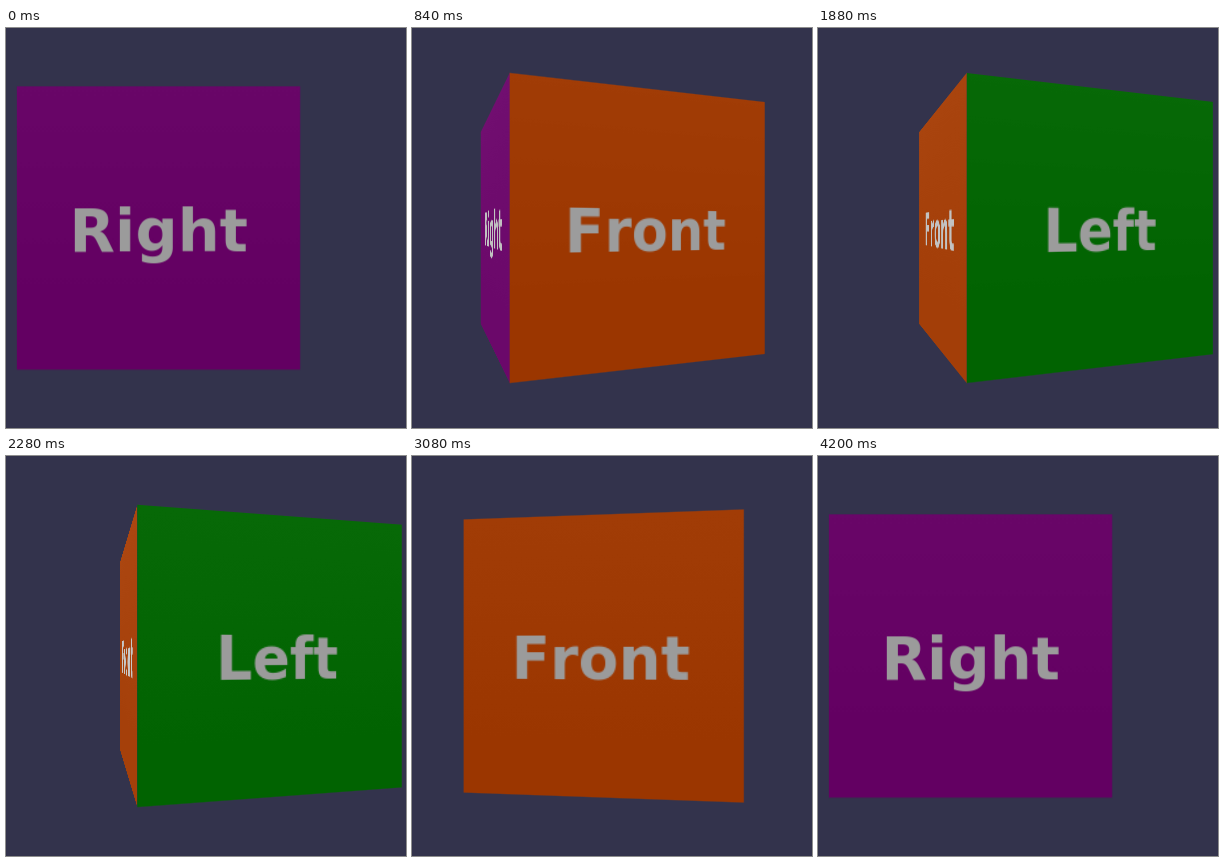
These frames come from a looping animation (400x400 px, 4.24 s). An HTML page:

```html
<!DOCTYPE html>
<html lang="en">
<head>
<meta charset="utf-8">
<title>Swinging cube</title>
<style>
  html, body { margin: 0; width: 100%; height: 100%; overflow: hidden; background: #33334c; }
  #stage {
    position: absolute; left: 0; top: 0; width: 400px; height: 400px;
    overflow: hidden; perspective: 473.04px; background: #33334c;
  }
  #cube {
    position: absolute; left: 50%; top: 50%; width: 0; height: 0;
    transform-style: preserve-3d;
  }
  .face {
    position: absolute; overflow: hidden; text-align: center; white-space: nowrap;
    font-family: "DejaVu Sans", Verdana, sans-serif; font-weight: bold;
    font-kerning: none; font-variant-ligatures: none;
    backface-visibility: hidden;
  }
</style>
</head>
<body>
<div id="stage"><div id="cube"></div></div>
<script>
  // World units: the cube is 3 wide and its centre is 6.5 from the eye.
  const UNIT = 473.04 / 6.5;
  const SIDE = 3 * UNIT;
  const LOOP = 4240, STEP = 40;

  // [time in ms, turn in degrees], straight lines in between
  const TURN = [[0, 90], [41, 90], [2115, -90], [2124, -90], [4192, 90], [LOOP, 90]];

  const FACES = [
    { label: "Right", angle: -90, rgb: [99, 0, 98] },
    { label: "Front", angle: 0, rgb: [155, 54, 0] },
    { label: "Left", angle: 90, rgb: [1, 99, 1] }
  ];

  const cube = document.getElementById("cube");

  for (const face of FACES) {
    const el = face.el = document.createElement("div");
    el.className = "face";
    el.textContent = face.label;
    Object.assign(el.style, {
      left: -SIDE / 2 + "px",
      top: -SIDE / 2 + "px",
      width: SIDE + "px",
      height: SIDE + "px",
      fontSize: SIDE * 0.2085 + "px",
      lineHeight: SIDE + 6 + "px",
      transform: `rotateY(${face.angle}deg) translateZ(${SIDE / 2}px)`
    });
    cube.append(el);
  }

  function turnAt(t) {
    const i = TURN.findIndex(key => key[0] > t);
    const [t0, a] = TURN[i - 1], [t1, b] = TURN[i];
    return a + (b - a) * (t - t0) / (t1 - t0);
  }

  const lighten = (rgb, by) => `rgb(${rgb.map(c => Math.round(c + by)).join()})`;

  function draw() {
    const t = Math.floor(performance.now() % LOOP / STEP) * STEP;
    const turn = turnAt(t);
    cube.style.transform = `translateX(${-turn / 90 * UNIT / 2}px) rotateY(${turn}deg)`;

    // Faces seen at a slant look a little brighter.
    for (const { el, angle, rgb } of FACES) {
      const slant = Math.sin((turn + angle) * Math.PI / 180) ** 4;
      el.style.color = lighten([155, 155, 155], 50 * slant);
      el.style.background =
        `linear-gradient(${lighten(rgb, 6 + 11 * slant)}, ${lighten(rgb, 11 * slant)} 80%)`;
    }
    requestAnimationFrame(draw);
  }
  draw();
</script>
</body>
</html>
```
